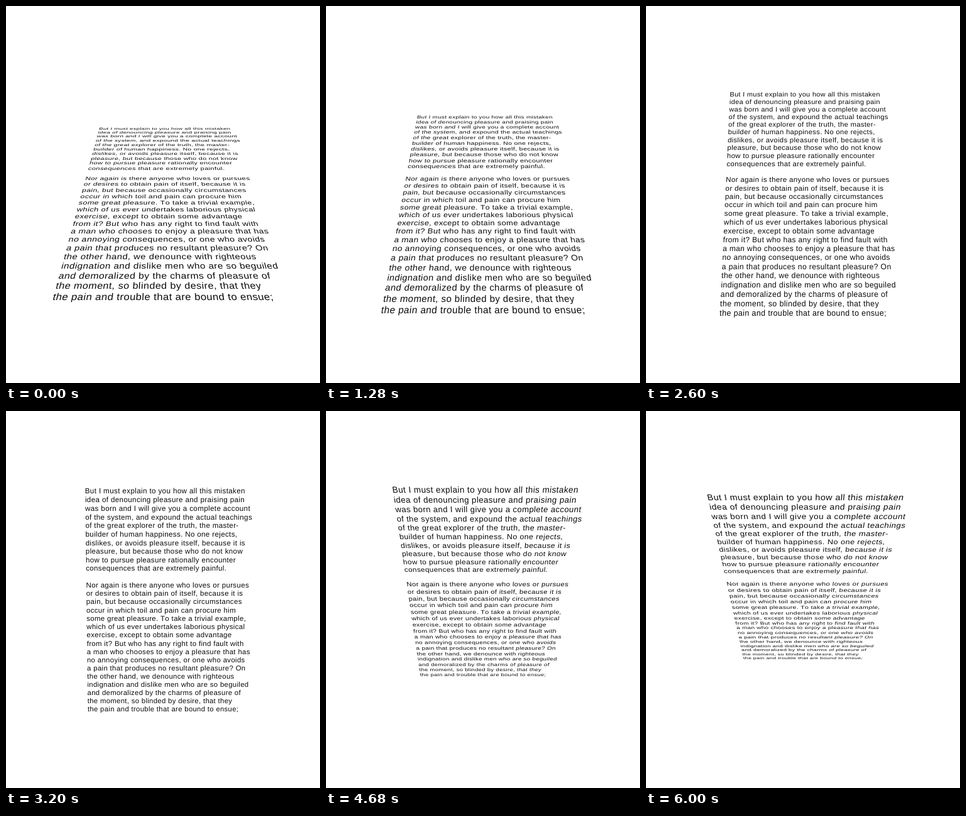
These frames come from a looping animation (500x600 px, 6040 ms). An HTML page with a canvas:

```html
<!DOCTYPE html>
<html lang="en">
<head>
<meta charset="utf-8">
<title>Tilting text</title>
<style>
html, body { margin: 0; width: 500px; height: 600px; overflow: hidden; background: #fff; }
canvas { display: block; }
</style>
</head>
<body>
<canvas id="stage" width="500" height="600"></canvas>
<script>
const LOOP = 6040, STEP = 40;
const FROM = 46.4, TO = -44;          // tilt in degrees
const DEPTH = 500, CX = 250, CY = 300; // perspective
const PIVOT = 271;
const LEFT = 127.4, TOP = 133.6, LEADING = 13.43, GAP = 12.65;
const SIZE = 11.5, TRACKING = 0.352, BASE = 100;

const paragraphs = [`But I must explain to you how all this mistaken
idea of denouncing pleasure and praising pain
was born and I will give you a complete account
of the system, and expound the actual teachings
of the great explorer of the truth, the master-
builder of human happiness. No one rejects,
dislikes, or avoids pleasure itself, because it is
pleasure, but because those who do not know
how to pursue pleasure rationally encounter
consequences that are extremely painful.`,
`Nor again is there anyone who loves or pursues
or desires to obtain pain of itself, because it is
pain, but because occasionally circumstances
occur in which toil and pain can procure him
some great pleasure. To take a trivial example,
which of us ever undertakes laborious physical
exercise, except to obtain some advantage
from it? But who has any right to find fault with
a man who chooses to enjoy a pleasure that has
no annoying consequences, or one who avoids
a pain that produces no resultant pleasure? On
the other hand, we denounce with righteous
indignation and dislike men who are so beguiled
and demoralized by the charms of pleasure of
the moment, so blinded by desire, that they
the pain and trouble that are bound to ensue;`];

const ctx = document.getElementById('stage').getContext('2d');
ctx.font = `${BASE}px "Liberation Sans", Arial, sans-serif`;
ctx.textRendering = 'geometricPrecision';

// Lay out every glyph on the flat page, relative to the pivot.
const glyphs = [];
const scale = SIZE / BASE;
let v = TOP - PIVOT;
for (const paragraph of paragraphs) {
  for (const line of paragraph.split('\n')) {
    let u = LEFT - CX;
    for (const char of line) {
      if (char !== ' ') glyphs.push({ char, u, v });
      u += ctx.measureText(char).width * scale + TRACKING;
    }
    v += LEADING;
  }
  v += GAP;
}

// Project the glyph's baseline point and use the local slope of the projection.
function drawGlyph({ char, u, v }, sin, cos) {
  const s = 1 / (1 - v * sin / DEPTH);
  const y = v * cos + PIVOT - CY;
  const slope = s * s * sin / DEPTH;
  ctx.setTransform(s * scale, 0, u * slope * scale, (cos * s + y * slope) * scale, CX + u * s, CY + y * s);
  ctx.fillText(char, 0, 0);
}

function draw() {
  const t = Math.floor(performance.now() % LOOP / STEP) * STEP;
  const p = t / LOOP;
  const eased = p * p * (3 - 2 * p);
  const angle = (FROM + (TO - FROM) * eased) * Math.PI / 180;
  const sin = Math.sin(angle), cos = Math.cos(angle);
  ctx.resetTransform();
  ctx.fillStyle = '#fff';
  ctx.fillRect(0, 0, 500, 600);
  ctx.fillStyle = '#0c0c0c';
  for (const glyph of glyphs) drawGlyph(glyph, sin, cos);
  requestAnimationFrame(draw);
}
draw();
</script>
</body>
</html>
```
